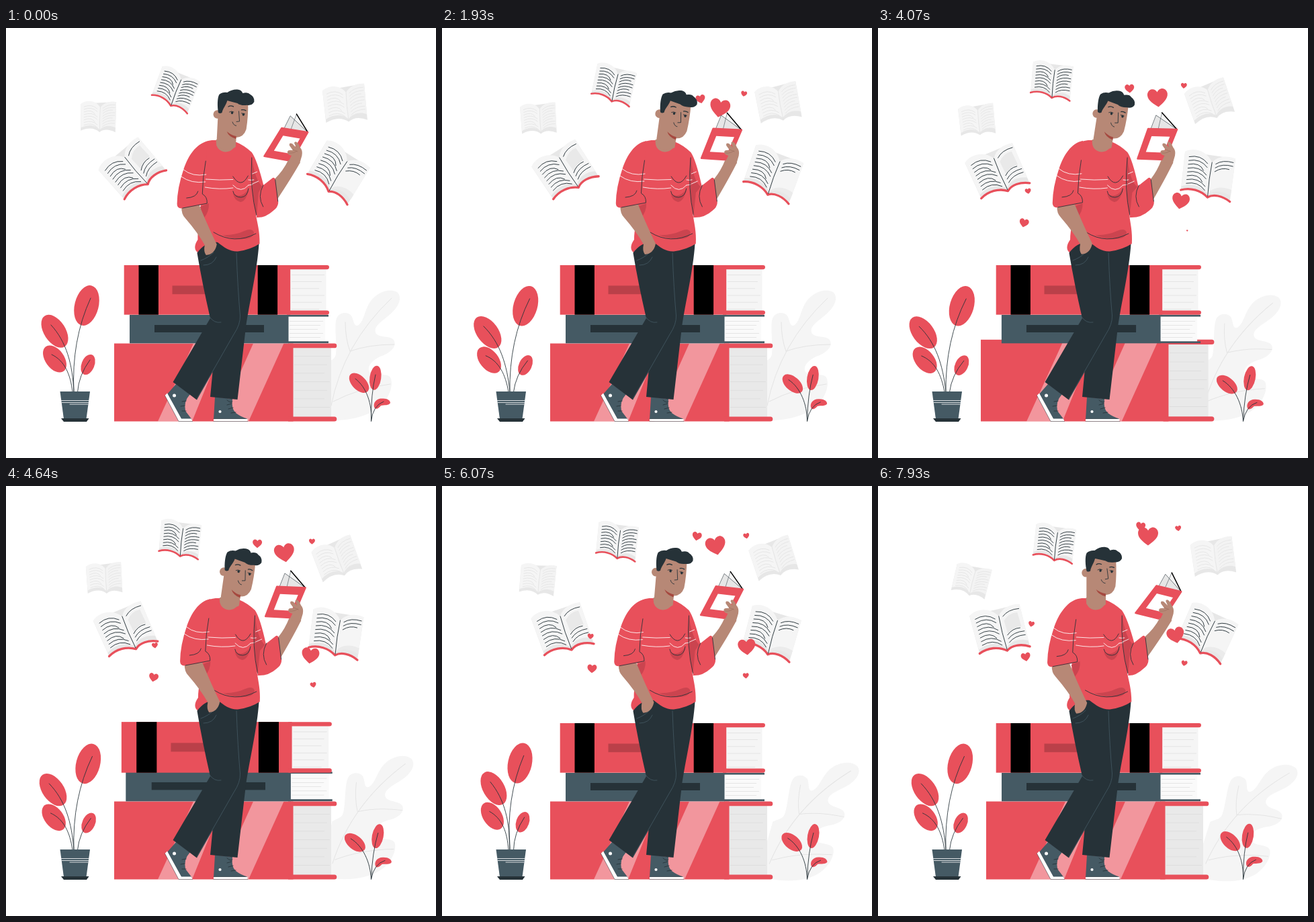
Write an HTML page with a canvas that moves like this. It is 640 px wide and 640 px high and loops after 8000 ms.

```html
<!DOCTYPE html>
<html lang="en">
<head>
<meta charset="utf-8">
<title>Reader</title>
<style>
html, body { margin: 0; width: 100%; height: 100%; overflow: hidden; background: #fff; }
canvas { display: block; width: 100vw; height: 100vh; }
</style>
</head>
<body>
<canvas id="stage"></canvas>
<script>
const canvas = document.getElementById('stage');
const ctx = canvas.getContext('2d');
const ratio = window.devicePixelRatio || 1;
canvas.width = canvas.height = 640 * ratio;

const LOOP = 8000, FPS = 14;
const RED = '#e8505b', DEEP = '#cb444f', INK = '#263238', SLATE = '#455a64', SKIN = '#b78876';
const PALE = '#f5f5f5', GREY = '#e0e0e0';

// Motion rules
const mix = (a, b, u) => a + (b - a) * u;
const ease = (t, from, to) => {
  const u = Math.min(1, Math.max(0, (t - from) / (to - from)));
  return u * u * (3 - 2 * u);
};
const phase = (t, peak, period) => (t - peak) / period * Math.PI * 2;
const wave = (t, peak, period) => Math.cos(phase(t, peak, period));
const radians = deg => deg * Math.PI / 180;

// Drawing helpers
function fill(d, color) { ctx.fillStyle = color; ctx.fill(new Path2D(d)); }
function line(d, color = INK, width = 0.85) {
  ctx.strokeStyle = color; ctx.lineWidth = width; ctx.stroke(new Path2D(d));
}
function rect(x, y, w, h, color) { ctx.fillStyle = color; ctx.fillRect(x, y, w, h); }
function oval(x, y, rx, ry, deg, color) {
  ctx.fillStyle = color;
  ctx.beginPath();
  ctx.ellipse(x, y, rx, ry, radians(deg), 0, Math.PI * 2);
  ctx.fill();
}
function group(draw) { ctx.save(); draw(); ctx.restore(); }
function place(x, y, deg, size, draw) {
  group(() => { ctx.translate(x, y); ctx.rotate(radians(deg)); ctx.scale(size, size); draw(); });
}
function about(x, y, deg, size, draw) {
  place(x, y, deg, size, () => { ctx.translate(-x, -y); draw(); });
}

// Large pale leaf
function paleLeaf(t) {
  about(486, 578, 13.4 * ease(t, 2100, 7000), 1, () => {
    fill('M470 584C505 586 540 580 560 560C572 547 577 530 572 520C566 512 548 521 541 512C536 502 548 492 562 487C574 482 581 473 578 466C574 456 554 463 550 453C547 443 562 435 573 425C586 413 590 400 582 393C570 386 552 394 543 406C533 420 534 434 525 442C517 447 518 433 513 427C507 422 496 423 492 432C488 444 493 470 491 485C490 493 484 494 476 500Z', PALE);
    line('M484 562Q502 470 574 402M512 481Q505 462 505 438M512 481Q540 471 578 471M487 556Q525 536 572 530', '#e4e4e4', 1);
  });
}

// Stack of books, pulsing one after another from the bottom up
function pulse(t, order) {
  const u = (t - 4050 - order * 375) / 460;
  return 1 + (Math.abs(u) < 1 ? 0.05 * Math.cos(u * Math.PI / 2) ** 2 : 0);
}
function rules(x, w, y, gap, count, color) {
  for (let i = 0; i < count; i++) rect(x, y + gap * i, w - (i % 3) * 4, 0.8, color);
}
const edge = (x, y, end, h) => fill(`M${x} ${y}H${end - h / 2}a${h / 2} ${h / 2} 0 0 1 0 ${h}H${x}Z`, RED);
function bookStack(t) {
  about(326, 585.5, 0, pulse(t, 0), () => {
    rect(427, 475, 57, 104, '#e9e9e9');
    rules(429, 53, 488, 12.7, 7, '#dcdcdc');
    rect(161, 469.5, 266.5, 116, RED);
    edge(420, 469.5, 492.3, 6.8);
    edge(420, 578.5, 492.3, 7);
    fill('M279 469.5H324L277 585.5H226ZM368 469.5H413.5L361 585.5H316Z', 'rgba(255,255,255,.4)');
  });
  about(332, 469, 0, pulse(t, 1), () => {
    rect(420, 429, 55, 38, '#fafafa');
    rules(422, 50, 436, 6, 5, GREY);
    rect(184, 427, 236.5, 42.3, SLATE);
    rect(420, 427, 60, 2.6, SLATE);
    rect(420, 466.3, 60, 2.8, SLATE);
    rect(221, 442, 163, 11, INK);
  });
  about(328, 426.5, 0, pulse(t, 2), () => {
    rect(423, 358, 53.5, 64, PALE);
    rules(425, 49, 367, 10.2, 6, GREY);
    rect(175.7, 353, 247.5, 73.7, RED);
    edge(418, 353, 481, 6.2);
    edge(418, 420.5, 481, 6.2);
    for (const x of [197.5, 374.7]) rect(x, 353, 29.4, 73.7, '#000');
    rect(247.5, 383.5, 68, 12.7, '#ba4049');
  });
}

// Flying open books ease from one pose (x, y, tilt) to a turning pose and on to a last one
const FLYERS = [
  { kind: 'text', size: 1, turn: 3600, poses: [[252, 93, 26], [259, 80, 10.5], [263, 87, 11.5]] },
  { kind: 'image', size: 1.27, turn: 4070, poses: [[189.5, 211.5, -36], [179, 216, -19], [182.5, 216.5, -9.5]] },
  { kind: 'short', size: 1.26, turn: 4000, poses: [[493.5, 216.5, 36], [491.5, 222, 12], [489.5, 220.5, 29]] },
  { kind: 'pale', size: 1.04, turn: 5100, poses: [[505.5, 115, -6], [493, 110.5, -21], [500, 108, -8]] },
  { kind: 'pale', size: 0.87, turn: 3400, poses: [[138, 134, 1], [148.5, 138.5, -7], [139, 142.5, 13.5]] }
];
function pose(t, turn, [a, b, c]) {
  const u = ease(t, 0, turn), v = ease(t, turn, LOOP);
  return a.map((start, k) => mix(start, b[k], u) + (c[k] - b[k]) * v);
}
function openBook(kind, size) {
  const pale = kind === 'pale', ink = pale ? '#e5e5e5' : INK, w = 0.85 / size;
  if (pale) ctx.transform(1, 0, -0.09, 1, 0, 0);
  fill('M-33-24L-28.5 22Q-10 13 4 24Q14 16 31 24L27-28Z', '#e7e7e7');
  if (!pale) line('M-28.5 21.5C-18 16-5 17 4 23.5C10 18 21 18 31 23', RED, 2.6);
  fill('M-33-24C-25-31-8-31 .8-18L4 20C-5 11-18 11-28.8 17Z', PALE);
  fill('M.8-18C6-27 17-30 27-28L30.5 16C20 11 10 13 4 20Z', pale ? '#f3f3f3' : PALE);
  line('M.8-18Q1 2 4 22', ink, w);
  if (kind === 'image') fill('M6-12Q13-20 23-19L25-2Q14-2 8 4Z', '#e9e9e9');
  if (kind === 'short') fill('M6 15Q15 6 30 9L30.500 16Q14 10 4 20Z', '#ebebeb');
  for (let i = 0; i < 8; i++) {
    const y = -19 + i * 4.5, cut = i % 3 === 2 ? 4 : 0;
    line(`M${-27 + i * 0.45} ${y}q13-5.500 ${23 - cut} 3.500`, ink, w);
    if (kind === 'short' && i > 2 || kind === 'image' && i > 0 && i < 5) continue;
    line(`M${5.5 + i * 0.35} ${y + 2}q7-7 ${20 - cut}-6`, ink, w);
  }
}
function flyer(t, { kind, size, turn, poses }) {
  place(...pose(t, turn, poses), size, () => openBook(kind, size));
}

// Plants: every leaf and its stalk swing about the root
function sprig(x, y, deg, stalk, leaf) {
  about(x, y, deg, 1, () => { leaf(); line(stalk); });
}
function pottedPlant(t) {
  const p = ease(t, 0, 3200) - 1.7 * ease(t, 3200, 6450) + 1.05 * ease(t, 6450, LOOP);
  sprig(101, 541, 2.9 * p, 'M101 542Q97 465 126 402', () => oval(120, 413, 17.8, 30.5, 14, RED));
  sprig(101, 541, -4.6 * p, 'M101 542C99 500 90 467 67 442', () => oval(72.5, 451.3, 16, 27.3, -33, RED));
  sprig(101, 541, -4.6 * p, 'M99 542C96 515 87 495 68 486', () => oval(72.5, 492.5, 14, 22.7, -36, RED));
  sprig(105, 541, 4.6 * p, 'M106.500 542Q108 517 125 494', () => oval(122, 501, 9.6, 15.8, 22, RED));
  fill('M80.500 541H125L119.500 582H86Z', SLATE);
  line('M82.500 554.500H123M83 557.500H122.500M95 560H122', '#fff', 0.8);
  fill('M82 581H123.500L120 586H86Z', INK);
}
function sprout(t) {
  const q = 0.39 + 0.62 * wave(t, 4300, 12000);
  sprig(543, 585, -6.3 * q, 'M543.500 585C545 560 537 535 520 522', () => oval(525.5, 528.3, 10.4, 18, -45, RED));
  sprig(543, 585, 3.1 * q, 'M543.500 585Q543 545 550 516', () => oval(549.8, 520.7, 8.5, 18.2, 8, RED));
  sprig(543, 585, 4 * q, 'M543.500 585Q546 562 562 556', () =>
    fill('M549 566C545 559 551 551 560 551.500C567 551 572 554 572 558C570 562 563 561 558 562C555 566 551 568 549 566Z', RED));
}

// Hearts grow at birth, rise steadily and sway, leaning the way they drift
const HEARTS = [
  { back: true, w: 30, born: 900, x: 409.5, y: 127, rise: 7.4, sway: 7.5, peak: 3400 },
  { back: true, w: 14, born: 1000, x: 383.5, y: 113, rise: 7.6, sway: -9.5, peak: 4400 },
  { back: true, w: 9, born: 1050, x: 450.5, y: 103, rise: 5.8, sway: 5, peak: 4500 },
  { w: 26, born: 2530, x: 445, y: 271, rise: 9, sway: 9.5, peak: 5400 },
  { w: 9, born: 3750, x: 459.5, y: 304, rise: 9.6, sway: -7.5, peak: 6400 },
  { w: 9, born: 2350, x: 227, y: 258.5, rise: 9.5, sway: -6.5, peak: 5400 },
  { w: 14, born: 3150, x: 217.5, y: 298, rise: 9.1, sway: 6, peak: 6300 }
];
function heart(t, { w, born, x, y, rise, sway, peak }) {
  if (t <= born) return;
  const a = phase(t, peak, 9000);
  const lean = -13 * Math.sign(sway) * Math.sin(a);
  place(x + sway * Math.cos(a), y - rise * (t - born) / 1000, lean, w / 30 * ease(t, born, born + 700), () =>
    fill('M0 13.500C-6 9-15 3-15-5C-15-10-11-13.500-7.500-13.500C-4-13.500-1-11 0-8.500C1-11 4-13.500 7.500-13.500C11-13.500 15-10 15-5C15 3 6 9 0 13.500Z', RED));
}

// Reader: s is the sideways sway of the upper body
function legs() {
  fill('M253 530L274 545Q264 556 267 570L277 583H258L239 546Z', SLATE);
  fill('M240 543.500L261 581.500H276L277.500 585.500H257L236.500 547Z', '#fff');
  line('M236.500 547L257 585.500H277.500', INK, 0.5);
  oval(250.5, 547, 2.5, 2.5, 0, '#fff');
  line('M262 556L268 555M260 563L266 562M262 570L268 570');
  fill('M311 549L337 552Q335 567 342 573Q350 579 359 581.500V583H309Z', SLATE);
  rect(309, 581.8, 50.5, 3.6, '#fff');
  line('M309 585.500H360M309 581.500H357', INK, 0.5);
  oval(318.5, 571, 2.1, 2.1, 0, '#fff');
  line('M329 561L336 559M331 567L338 565M335 573L342 572M329 554q6 5 8 2');
  fill('M284.500 335L288 325L304 316L376.500 321C374 360 362 410 357 445L344.500 553L304 549L307.500 512L284 553.500L248.500 527L304 432Q292 380 284.500 335Z', INK);
  line('M343 335Q345 390 348.500 428Q349 441 339 456L284 552M303 430Q310 440 320 438M294 353Q308 353 313 341M290 346Q301 342 309 334', SLATE, 0.8);
}
function torso(s) {
  const k = 0.0375 * s;
  group(() => {
    ctx.transform(1, 0, -k, 1, 330 * k, 0);
    fill('M312 167C294 166 283 177 277 188L290 265C289 285 285 300 285.500 315C280 323 280 330 285 334C292 324 304 317 315 319C325 327 334 333 345 332.500Q364 330 377.500 321C378 303 374 290 372 278L384 236Q374 196 366 185Q354 174 341 169Z', RED);
    fill('M289 266L302 261Q303 273 294 284Z', DEEP);
    fill('M366 190Q370 228 384 238L376 279H373Q364 240 366 190Z', DEEP);
    fill('M322 308Q340 309 355 302Q366 297 369 304Q369 313 354 314Q338 315 322 308Z', DEEP);
    fill('M338 246Q350 255 361 240Q358 258 349 259Q340 257 338 246Z', DEEP);
    line('M297.500 225Q318 227 338 225.500M361 226Q366 227 369 226M296.500 237Q318 241 338 238M361 234L367 233M338 234Q350 247 361 234', '#fff');
    line('M338 221Q350 240 360.500 220M338 243Q340 252 350 252Q360 251 361 239M309 304Q340 323 372 306M366 193Q363 240 373 279');
  });
}
function leftArm(s) {
  group(() => {
    ctx.translate(5 * s, -1.2 * s);
    fill('M261.500 266Q261 277 267 283Q286 305 296 323Q294 333 298 338Q311 337 314 322Q303 300 288 264Z', SKIN);
    fill('M300 169C282 173 272 190 265 209Q255 238 254.800 262Q255 268 261 268.500L299 262Q302 256 293 246L298 199Z', RED);
    line('M264 210.500Q278 222 298 218M261 221Q276 232 297 229', '#fff');
    line('M297.500 198Q293 222 292.500 247Q300 251 299.500 261L263 268M269 253Q284 252 286 243');
  });
}
function neckAndHead(s) {
  group(() => {
    ctx.translate(5.8 * s, 0);
    fill('M313 166Q312 183 327 184.500Q341 184 342.500 167Z', SKIN);
    about(328, 175, 5.7 * s, 1, () => {
      oval(315, 128.5, 6, 6.3, 0, SKIN);
      fill('M319 104L361 110Q361 133 358 151Q354 163 343 163L342 177Q328 187 313.500 175L316 130Z', SKIN);
      fill('M329 154Q336 160 343 161L342.500 165Q332 162 329 154Z', '#a5483f');
      fill('M316.500 126C315 117 315 104 318 99Q323 95 330 96Q337 91 345 91.500Q351 92 353 97Q361 95 364 99Q371 103 370 110Q367 116 359 115Q350 116 345 112Q337 110 330 108C328 115 323 120 322 126Q319 128 316.500 126Z', INK);
      oval(337, 126.3, 1.7, 2, 0, INK);
      oval(353.8, 128.8, 1.7, 2, 0, INK);
      line('M331.500 117Q335 115 339 117M351 122Q354 121 357.500 123', INK, 1.3);
      line('M333 125Q336 123 339.500 125M351 127L356 128M347 124L348 139L343.500 139.500M337.500 140Q339 145 343 145.500');
    });
  });
}
function heldBook(s) {
  const at = (x0, y0, x1, y1) => [mix(x0, x1, s), mix(y0, y1, s)];
  const tl = at(410, 149, 402, 150), tr = at(449, 155, 445, 151);
  const br = at(425, 198, 427, 196), bl = at(384.5, 191, 386.5, 194.5);
  const p1 = at(423, 131, 414, 130), p2 = at(432, 128, 422.5, 126);
  const inner = (u, v) => [0, 1].map(i => mix(mix(tl[i], tr[i], u), mix(bl[i], br[i], u), v));
  const path = (...pts) => 'M' + pts.map(p => p.join(' ')).join('L');
  const back = path(p1, tr, inner(0.1, 0)) + 'Z', cover = path(tl, tr, br, bl) + 'Z';
  fill(path(p2, tr, inner(0.4, 0)), PALE);
  fill(back, '#e6e6e6');
  line(back, INK, 0.6);
  line(path(inner(0.35, 0), p2), INK, 0.5);
  line(path(p2, tr), '#000', 1.5);
  fill(cover, RED);
  line(cover, RED, 2.5);
  fill(path(inner(0.21, 0.24), inner(0.85, 0.24), inner(0.85, 0.77), inner(0.21, 0.77)), '#fff');
}
function rightArm(s) {
  const elbow = 6 * s, wrist = 1.5 * s, bend = 3 * s;
  fill(`M${400 + elbow} 225Q${413 + bend} 212 ${420 + wrist} 197L${438 + wrist} 200Q${427 + bend} 220 ${404 + elbow} 255Z`, SKIN);
  group(() => {
    ctx.translate(wrist, 0);
    fill('M419 184Q420 181 427 182L422 175Q421 170 426 172L432 178L429 171Q431 167 435 172L438 178Q442 182 440.500 190L437 202L420 200L425 190Q418 188 419 184Z', SKIN);
    line('M421 186Q428 187 433 183M427 181L434 184', '#9c6f5f', 0.7);
  });
  group(() => {
    ctx.translate(elbow * 0.9, 0);
    fill(`M${373 - 4 * s} 282Q386 283 398 272Q405 267 405.500 260L401 225Q399 221 396 224L382 235L${376 - 3 * s} 245Z`, RED);
    line('M383 234Q374 251 383 266M401 226L405 258');
    line('M367 217L374 214M367 232L376 228', '#fff');
  });
}
function reader(t) {
  const s = 0.12 + 0.92 * wave(t, 3350, 12000);
  legs();
  [torso, leftArm, neckAndHead, heldBook, rightArm].forEach(part => part(s));
}

function draw(now) {
  const t = Math.floor((now % LOOP) * FPS / 1000) * 1000 / FPS;
  ctx.setTransform(ratio, 0, 0, ratio, 0, 0);
  ctx.lineCap = ctx.lineJoin = 'round';
  rect(0, 0, 640, 640, '#fff');
  paleLeaf(t);
  bookStack(t);
  FLYERS.forEach(book => flyer(t, book));
  pottedPlant(t);
  sprout(t);
  HEARTS.filter(h => h.back).forEach(h => heart(t, h));
  reader(t);
  HEARTS.filter(h => !h.back).forEach(h => heart(t, h));
}

let start = null;
function tick(now) {
  if (start === null) start = now;
  draw(Math.max(0, now - start));
  requestAnimationFrame(tick);
}
draw(0);
requestAnimationFrame(tick);
</script>
</body>
</html>
```
